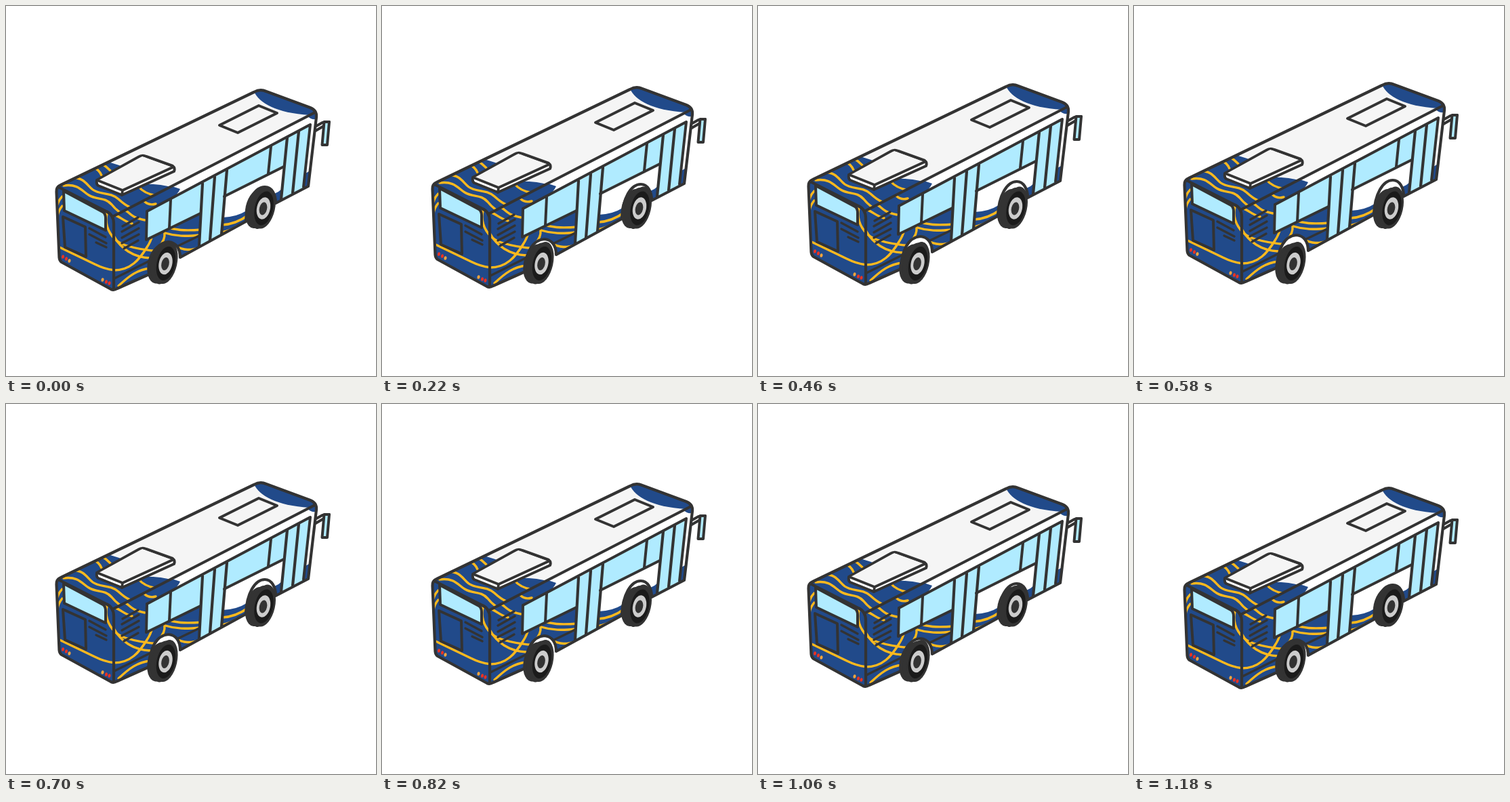
Animation of 546 by 546 pixels, one loop 1.2 s. Source, as an HTML page with a canvas:

```html
<!DOCTYPE html>
<html lang="en">
<head>
<meta charset="utf-8">
<title>Bouncing bus</title>
<style>
  html, body { margin: 0; width: 100%; height: 100%; overflow: hidden; background: #fff; }
  canvas { display: block; width: 546px; height: 546px; }
</style>
</head>
<body>
<canvas id="stage"></canvas>
<script>
const SIZE = 546, LOOP = 1200, STEP = 60;
const INK = '#333', BLUE = '#214a8a', GOLD = '#fdb91e', GLASS = '#b0ebff',
      ROOF = '#f5f5f5', RED = '#ea3323', AMBER = '#fba63c';

const canvas = document.getElementById('stage');
const ctx = canvas.getContext('2d');
const ratio = window.devicePixelRatio || 1;
canvas.width = canvas.height = SIZE * ratio;

function fill(d, color) {
  ctx.fillStyle = color;
  ctx.fill(new Path2D(d));
}
function line(d, width = 4.2, color = INK) {
  ctx.strokeStyle = color;
  ctx.lineWidth = width;
  ctx.stroke(new Path2D(d));
}
function shape(d, color, width) {
  fill(d, color);
  line(d, width);
}
function clipped(d, draw) {
  ctx.save();
  ctx.clip(new Path2D(d));
  draw();
  ctx.restore();
}
function oval(x, y, rx, ry, color, tilt = 0.22) {
  ctx.fillStyle = color;
  ctx.beginPath();
  ctx.ellipse(x, y, rx, ry, tilt, 0, Math.PI * 2);
  ctx.fill();
}
const wave = d => line(d, 3.4, GOLD);

const BODY = 'M74.5 274Q74 267 81 264L366 127Q375 122 384 126L449 150Q459 154 458 164L446 266L159 419L82 378Q79 376 78.5 371Z';
const TOP = 'M76 267L366 127Q375 122 384 126L449 150Q457 154 457 158L159 310Z';
const REAR = 'M75 267L148 303Q159 308 159 320V419L79 376Z';
const SIDE = 'M159 310L457 157L446 266L257 371L210 398L159 419Z';
const REAR_ARCH = 'M211 396C212 368 222 349 240 348C251 349 257 358 257 371Z';
const FRONT_ARCH = 'M354 318C355 288 367 267 382 267C392 267 398 278 398 291Z';
const CORNER_SWEEP = 'M149 306C144 328 158 347 176 353Q198 360 226 362';

function drawRoof() {
  clipped(TOP, () => {
    fill(TOP, ROOF);
    fill('M70 264L150 225L154 231Q166 234 178 240L197 263Q228 262 246 268L159 314Z', BLUE);
    fill('M366 126C373 143 399 158 448 161L462 158V140L378 118Z', BLUE);
    wave('M98 253C116 254 119 264 128 271C139 279 153 274 166 285C178 296 186 300 204 302');
    wave('M85 265C107 262 112 273 122 279C135 287 145 281 156 293C164 303 171 308 181 310');
    wave('M130 239Q137 241 141 250M142 233Q148 237 154 243');
    wave('M195 266Q204 277 222 280Q232 280 238 276');
  });

  line('M315 176L373 147L400 158L342 187Z', 4);
  shape('M134 257L195 223Q201 219 207 222L246 236Q250 239 248 244L171 279L136 265Q133 263 134 257Z', '#fff', 4);
  fill('M137 257L201 222L247 239L173 272Z', ROOF);
  line('M137 258L172 272L246 238M172 272L171 279', 3.8);
}

function drawRear() {
  clipped(REAR, () => {
    fill(REAR, BLUE);
    wave('M76 293Q78 286 83 281M76 311Q77 302 83 295');
    wave('M79 356L131 381Q147 389 162 390');
    wave(CORNER_SWEEP);
  });
  shape('M85 273L143 304Q147 307 147 313V331L86 302Z', GLASS, 4);
  line('M84 311L117 326L118 370L87 356Z', 4);
  line('M123 328L147 341M123 337L148 350M133 349L148 356', 3.4);
  oval(84, 370, 2, 2.8, RED);
  oval(89, 373, 2, 2.8, RED);
  oval(93.5, 376, 2, 2.8, AMBER);
  oval(142.5, 404, 2, 2.8, AMBER);
  oval(148, 407, 2, 2.8, RED);
  oval(152.5, 409, 2, 2.8, RED);
}

function drawSide() {
  clipped(SIDE, () => {
    fill(SIDE, '#fff');
    fill('M159 310L245 266L257 270Q253 279 243 285L289 308L285 357L159 421Z', BLUE);
    fill('M320 312Q341 311 355 302V321L318 340Z', BLUE);
    fill('M396 277Q402 275 407 270L405 289L396 294Z', BLUE);
    fill('M440 248L449 243L446 267L437 271Z', BLUE);
    fill('M444 161L458 154L456 167Q449 168 444 161Z', BLUE);

    wave('M176 301C183 306 185 312 205 316M159 308C169 311 176 319 186 321');
    wave('M204 288Q211 295 221 292');
    wave(CORNER_SWEEP);
    wave('M159 339C169 358 188 371 213 372');
    wave('M159 390C184 390 197 374 208 356Q214 347 216 338');
    wave('M234 334Q235 346 226 354');
    wave('M166 413C182 398 194 389 213 387');
    wave('M233 325C250 331 263 332 289 330');
    wave('M235 335C251 340 265 340 287 338');
    wave('M250 354C262 361 273 361 287 356');
    wave('M319 323Q339 322 357 309M318 334Q330 332 341 325');
  });

  line('M172 325L195 312M171 333L196 319M171 342L196 328M171 350L196 337M174 358L195 346', 3.4);
  line('M160 402L212 376M254 354L285 339', 3.6);

  fill('M208 303L289 261L287 306L207 345Z', GLASS);
  fill('M326 241L414 194L410 236L322 281Z', GLASS);
  fill('M290 262L326 242L318 337L285 354Z', GLASS);
  fill('M415 194L449 175L439 268L406 285Z', GLASS);

  line('M208 303L449 175L439 267', 4);
  line('M208 303L207 345L287 306M243 286L241 328', 4);
  line('M290 262L285 354M308 252L301 346M326 242L318 337');
  line('M322 281L410 237M391 207L387 247', 4);
  line('M415 194L406 285M432 185L423 276');
}

function drawMirror() {
  line('M458 177L467 172L477 171M457 184L469 177', 3.8);
  shape('M469.5 171L477 171L474 205L466.5 205Z', GLASS, 4);
}

function drawBody() {
  fill(BODY, '#fff');
  drawRoof();
  drawRear();
  drawSide();
  line('M77 267L148 303Q159 308 159 321V418M157 311L456 157');
  fill(REAR_ARCH, '#fff');
  fill(FRONT_ARCH, '#fff');
  line('M398 291L446 266L458 164Q459 154 449 150L384 126Q375 122 366 127L81 264Q74 267 74.5 274L78.5 371Q79 376 82 378L155 418Q159 420 164 417L211 396C212 368 222 349 240 348C251 349 257 358 257 371L354 318C355 288 367 267 382 267C392 267 398 278 398 291');
  drawMirror();
}

function drawWheel(x, y) {
  ctx.save();
  ctx.translate(x, y);
  oval(-9.5, 0.5, 17, 29.5, INK);
  oval(-4, 0, 17, 31, INK);
  oval(1, -1, 16, 31.5, INK);
  oval(0.5, 0, 13.5, 25.5, '#1b1b1b');
  oval(0, 0, 9.8, 16.5, '#ccc');
  oval(-0.5, 0.5, 5.6, 9.7, INK);
  ctx.restore();
}

function render(time) {
  const step = Math.floor((time % LOOP + STEP / 3) / STEP);
  const lift = 10 - Math.abs(step - 10);

  ctx.setTransform(ratio, 0, 0, ratio, 0, 0);
  ctx.fillStyle = '#fff';
  ctx.fillRect(0, 0, SIZE, SIZE);
  ctx.lineCap = ctx.lineJoin = 'round';

  ctx.save();
  ctx.translate(0, -lift);
  drawBody();
  ctx.restore();
  drawWheel(235.5, 380);
  drawWheel(380, 298.5);
}

const start = performance.now();
function tick() {
  render(performance.now() - start);
  requestAnimationFrame(tick);
}
tick();
</script>
</body>
</html>
```
